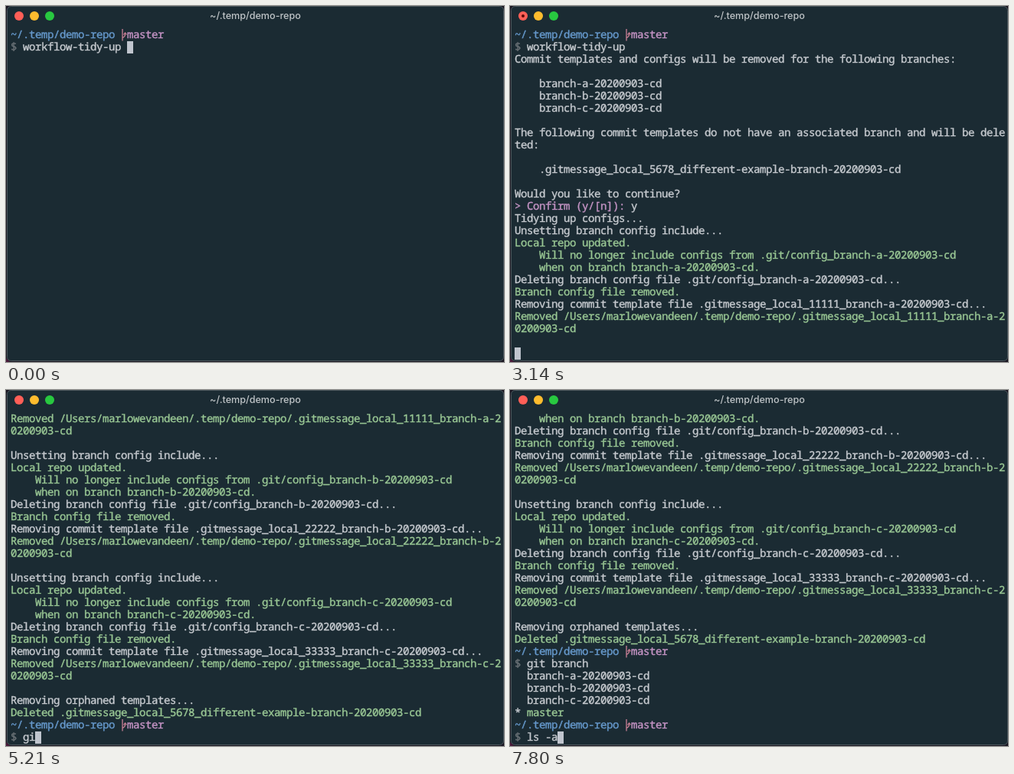
An HTML page for the animation above (8000 ms loop, 650 px wide and 465 px high).

```html
<!DOCTYPE html>
<html lang="en">
<head>
<meta charset="utf-8">
<title>Terminal</title>
<style>
  html, body { margin: 0; width: 100%; height: 100%; overflow: hidden; background: #1a1722; }
  svg { display: block; width: 650px; height: 465px; }
  text { white-space: pre; }
  #screen {
    font: 500 14px "Noto Sans Mono", "DejaVu Sans Mono", monospace;
    letter-spacing: -.4px; text-rendering: geometricPrecision;
    font-kerning: none; font-variant-ligatures: none; stroke-width: .4px;
  }
  #title { font: 500 12.6px Inter, Roboto, sans-serif; }
</style>
</head>
<body>
<svg viewBox="0 0 650 465" xmlns="http://www.w3.org/2000/svg">
  <rect width="650" height="465" fill="#1a1722"/>
  <path d="M0 460V465H5Z" fill="#4a1a3a"/>
  <rect x="1.5" y=".5" width="648" height="463" rx="5" fill="#1b2b33" stroke="#4c575d"/>
  <circle cx="17" cy="13" r="6" fill="#ff5f57"/>
  <circle cx="37" cy="13" r="6" fill="#febc2e"/>
  <circle cx="57" cy="13" r="6" fill="#28c840"/>
  <circle id="dot" cx="17" cy="13" r="2" fill="#5c0805"/>
  <text id="title" x="325.5" y="17" text-anchor="middle" fill="#bfc4c7">~/.temp/demo-repo</text>
  <g id="screen"></g>
  <rect id="cursor" width="8" height="16" fill="#c0c5ce"/>
</svg>
<script>
const LOOP = 8000, ROWS = 27, CELL = 8, LINE = 16, LEFT = 6, TOP = 30;
const FG = '#c6cacf', GREEN = '#99c794', BLUE = '#6699cc', PURPLE = '#c594c5',
      PINK = '#d9879f', GRAY = '#6c7378';
const $ = id => document.getElementById(id);
const screen = $('screen'), cursor = $('cursor'), dot = $('dot');

const lines = [];
const seg = (text, color = FG) => ({ text, color });
const add = (text, color) => lines.push({ segs: [seg(text, color)] });
const gap = () => add('');
const path = () => lines.push({
  segs: [seg('~/.temp/demo-repo ', BLUE), seg(' '), seg('master', PURPLE)], icon: 18
});
const ask = (prompt, color, input) => lines.push({ segs: [seg(prompt, color)], input });
const date = '-20200903-cd';
const orphan = '.gitmessage_local_5678_different-example-branch' + date;

function shell(input) {
  path();
  ask('$ ', GRAY, input);
}

function tidy(letter, digit) {
  const name = 'branch-' + letter, id = String(digit).repeat(5);
  add('Unsetting branch config include...');
  add('Local repo updated.', GREEN);
  add(`    Will no longer include configs from .git/config_${name}${date}`, GREEN);
  add(`    when on branch ${name}${date}.`, GREEN);
  add(`Deleting branch config file .git/config_${name}${date}...`);
  add('Branch config file removed.', GREEN);
  add(`Removing commit template file .gitmessage_local_${id}_${name}${date}...`);
  wrap(`Removed /Users/marlowevandeen/.temp/demo-repo/.gitmessage_local_${id}_${name}${date}`, GREEN);
  gap();
}

function wrap(text, color) {
  add(text.slice(0, 80), color);
  add(text.slice(80), color);
}

shell('workflow-tidy-up ');
add('Commit templates and configs will be removed for the following branches:');
gap();
for (const c of 'abc') add(`    branch-${c}${date}`);
gap();
wrap('The following commit templates do not have an associated branch and will be deleted:');
gap();
add('    ' + orphan);
gap();
add('Would you like to continue?');
ask('> Confirm (y/[n]): ', PURPLE, 'y');
add('Tidying up configs...');
[...'abc'].forEach((c, i) => tidy(c, i + 1));
add('Removing orphaned templates...');
add('Deleted ' + orphan, GREEN);
shell('git branch');
for (const c of 'abc') add(`  branch-${c}${date}`);
lines.push({ segs: [seg('* '), seg('master', GREEN)] });
shell('ls -a');

function make(tag, attrs, parent) {
  const el = document.createElementNS('http://www.w3.org/2000/svg', tag);
  for (const k in attrs) el.setAttribute(k, attrs[k]);
  return parent.appendChild(el);
}

function put(row, col, text, color) {
  const trimmed = text.trimStart();
  const x = LEFT + CELL * (col + text.length - trimmed.length);
  const el = make('text', { x, y: 12, fill: color, stroke: color }, row);
  el.textContent = trimmed;
  return el;
}

for (const line of lines) {
  line.row = make('g', {}, screen);
  line.width = 0;
  for (const s of line.segs) {
    put(line.row, line.width, s.text, s.color);
    line.width += s.text.length;
  }
  if (line.icon) {
    make('path', {
      d: 'M2.5 0V15.5M2.5 11.5Q6 10.5 6 6.5M4 7.5L6 5L8 7.5',
      transform: `translate(${LEFT + CELL * line.icon - .5})`,
      fill: 'none', stroke: PINK, 'stroke-width': 1.2
    }, line.row);
  }
  if (line.input) line.typed = put(line.row, line.width, '', FG);
}

// time, cursor line, characters typed on it
const steps = [
  [0, 1, 17], [1260, 2, 0], [1440, 14, 0],
  [3050, 14, 1], [3140, 26, 0], [3230, 30, 0], [3320, 36, 0], [3410, 49, 0],
  [5210, 49, 2], [5300, 49, 3], [5390, 49, 4], [5470, 49, 5],
  [5650, 49, 6], [5740, 49, 7], [5830, 49, 8], [6010, 49, 10],
  [6280, 55, 0], [7090, 55, 2], [7350, 55, 3], [7620, 55, 4], [7800, 55, 5]
];

function draw(t) {
  const [, at, count] = steps.filter(s => s[0] <= t).pop();
  const top = Math.max(0, at - ROWS + 1);
  lines.forEach((line, i) => {
    const shown = i >= top && (i < at || (i === at && line.input));
    line.row.style.display = shown ? '' : 'none';
    if (!shown) return;
    line.row.setAttribute('transform', `translate(0 ${TOP + LINE * (i - top)})`);
    if (line.input) line.typed.textContent = i < at ? line.input : line.input.slice(0, count);
  });
  const col = lines[at].input ? lines[at].width + count : 0;
  cursor.setAttribute('x', LEFT + CELL * col);
  cursor.setAttribute('y', TOP + LINE * (at - top));
  dot.style.display = t >= 1980 && t < 4220 ? '' : 'none';
}

const start = performance.now();
function tick() {
  draw((performance.now() - start) % LOOP);
  requestAnimationFrame(tick);
}
tick();
</script>
</body>
</html>
```
